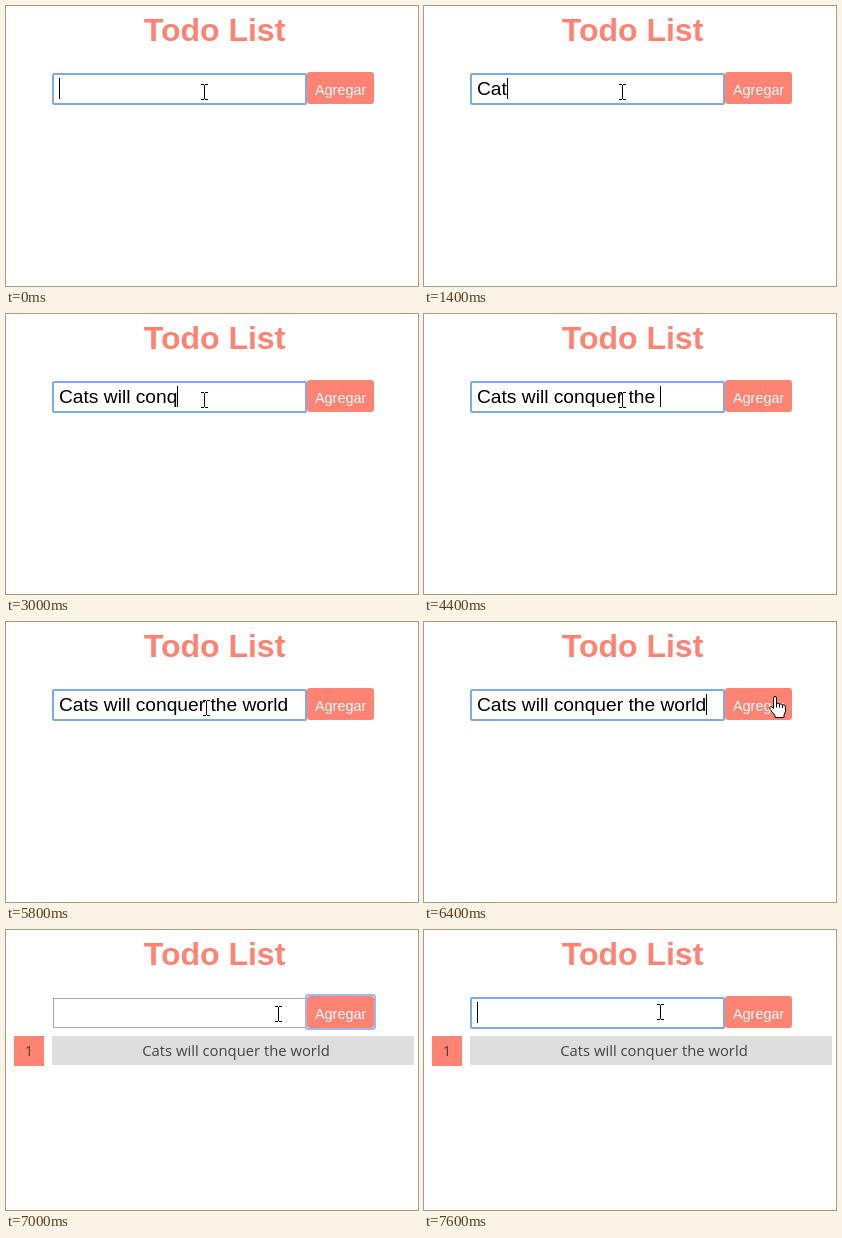
These frames come from a looping animation (412x280 px, 8 s). An HTML page:

```html
<!DOCTYPE html>
<html lang="es">
<head>
<meta charset="utf-8">
<title>Todo List</title>
<style>
  html, body { margin: 0; width: 100%; height: 100%; overflow: hidden; background: #fff; }
  svg { display: block; width: 412px; height: 280px; }
  text { font-family: "Liberation Sans", Arial, sans-serif; white-space: pre; }
  .accent { fill: #ff8373; }
  .title { font-size: 32px; font-weight: bold; text-anchor: middle; }
  .label { font-size: 14.4px; fill: #fff; }
  .entry { font-size: 19.2px; }
  .item text { font: 14.8px "Open Sans", "Noto Sans", sans-serif; fill: #444; text-anchor: middle; }
  .ring { fill: none; stroke-width: 2; }
  .crisp { shape-rendering: crispEdges; }
</style>
</head>
<body>
<svg viewBox="0 0 412 280">
  <text class="title accent" x="208.5" y="35">Todo List</text>

  <rect x="47.5" y="68.5" width="252" height="29" fill="#fff" stroke="#a9a9a9"/>
  <rect id="inputRing" class="ring" x="47" y="68" width="253" height="30" rx="1" stroke="#7fa9ea"/>
  <text id="entry" class="entry" x="53" y="89"></text>
  <rect id="caret" class="crisp" y="72" width="1" height="21"/>

  <rect class="accent" x="301" y="66" width="67" height="32" rx="3"/>
  <text class="label" x="309" y="89">Agregar</text>
  <rect id="buttonRing" class="ring" x="300" y="65" width="69" height="34" rx="2" stroke="#9db8f3"/>

  <g id="item" class="item">
    <rect class="accent" x="8" y="106" width="30" height="30"/>
    <text x="23" y="126">1</text>
    <rect x="46" y="106" width="362" height="29" fill="#dedede"/>
    <text x="230" y="126">Cats will conquer the world</text>
  </g>

  <path id="beam" class="crisp" d="M-3-8h3v1h-3zM1-8h3v1h-3zM0-7h1v14h-1zM-3 7h3v1h-3zM1 7h3v1h-3z"/>
  <g id="hand" fill="#fff" stroke="#000" stroke-linejoin="round">
    <path d="M4.5 12.5V2a1.5 1.5 0 0 1 3 0V7.5q1.5-.8 3 .5q1.5-.6 3 .8q1.5-.3 3 1.2V15.5L15 19v2.5H6V19.5L1.2 13.5q-1.2-2 .3-2.8q1.3-.5 3 1.8z"/>
    <path d="M7.5 7.5v4M10.5 8v3.5M13.5 9v3" fill="none"/>
  </g>
</svg>
<script>
const LOOP = 8000, CLICK = 6600, REFOCUS = 7600;
const MESSAGE = "Cats will conquer the world";
const $ = id => document.getElementById(id);

// Each row: start time in ms, then the values that hold from there on.
const typed = [
  [0, 0], [1000, 1], [1200, 2], [1400, 3], [1600, 4], [1800, 5],
  [2200, 7], [2400, 9], [2600, 10], [2800, 12], [3000, 14], [3200, 16],
  [3600, 17], [3800, 18], [4000, 20], [4200, 21], [4400, 22], [4600, 23],
  [5000, 24], [5200, 26], [5400, 27], [CLICK, 0]
];
const caretOn = [
  [0, true], [200, false], [800, true], [5800, false],
  [6400, true], [CLICK, false], [REFOCUS, true]
];
const pointer = [
  [0, "beam", 198, 86], [5800, "beam", 200, 86], [6200, "beam", 262, 86],
  [6400, "hand", 345, 74], [6600, "hand", 349, 73], [6800, "hand", 338, 73],
  [7000, "beam", 272, 84], [7200, "beam", 236, 82]
];

const at = (rows, t) => rows.findLast(row => row[0] <= t).slice(1);
const show = (id, visible) => $(id).setAttribute("visibility", visible ? "visible" : "hidden");

function draw(t) {
  const [count] = at(typed, t);
  const entry = $("entry");
  entry.textContent = MESSAGE.slice(0, count);
  const width = count ? entry.getComputedTextLength() : 0;
  $("caret").setAttribute("x", Math.round(53 + width));
  show("caret", at(caretOn, t)[0]);

  const buttonFocused = t >= CLICK && t < REFOCUS;
  show("inputRing", !buttonFocused);
  show("buttonRing", buttonFocused);
  show("item", t >= CLICK);

  const [shape, x, y] = at(pointer, t);
  for (const id of ["beam", "hand"]) show(id, id === shape);
  $(shape).setAttribute("transform", `translate(${x} ${y})`);
}

const start = performance.now();
function tick() {
  draw((performance.now() - start) % LOOP);
  requestAnimationFrame(tick);
}
tick();
</script>
</body>
</html>
```
